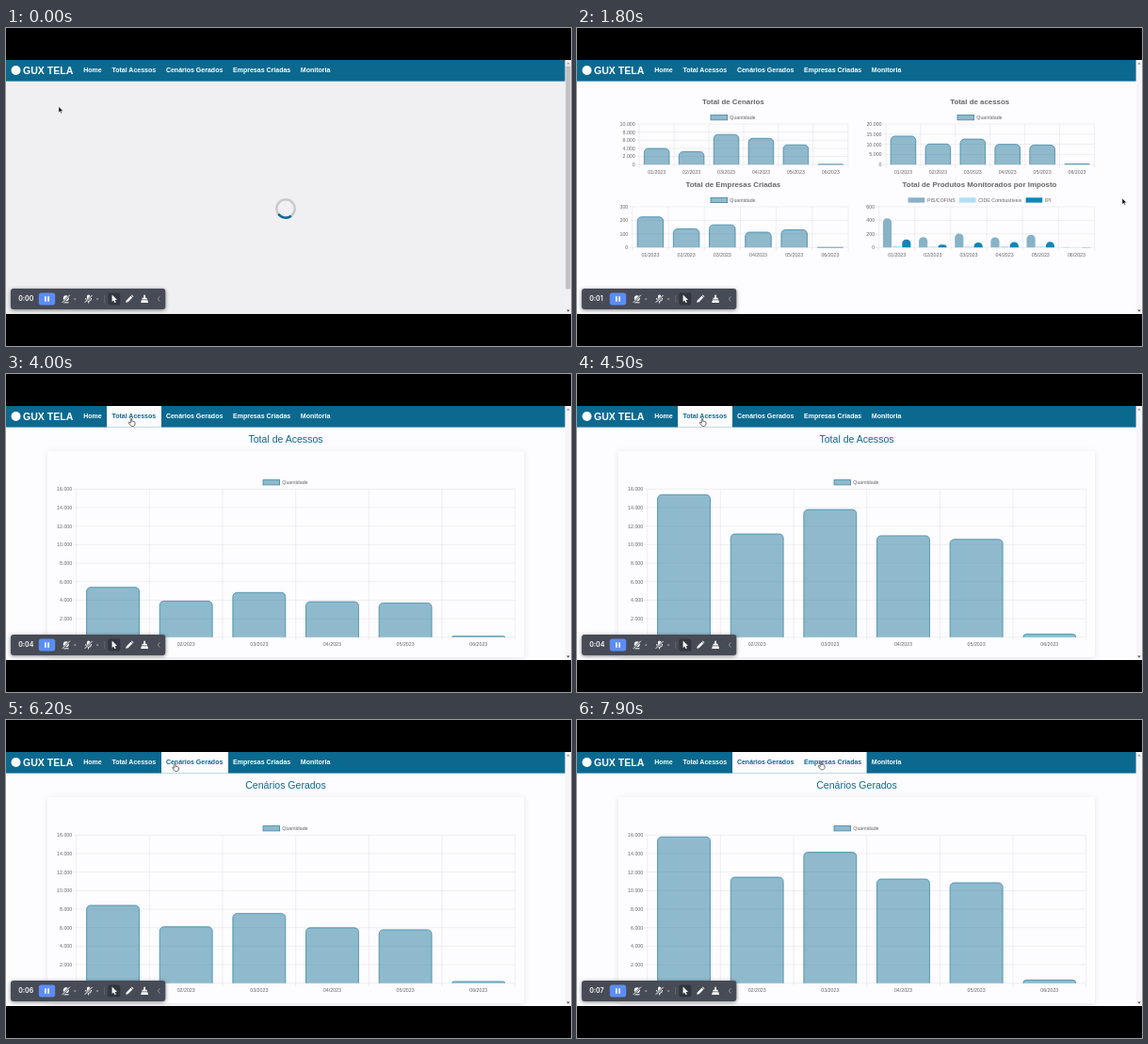
These frames come from a looping animation (600 by 338 pixels, 8 s). An HTML page:

```html
<!DOCTYPE html>
<html lang="pt-BR">
<head>
<meta charset="utf-8">
<title>Dashboard</title>
<style>
  html, body { margin: 0; width: 100%; height: 100%; overflow: hidden; background: #000; }
  svg { display: block; width: 600px; height: 338px; }
  text { font-family: "Liberation Sans", Arial, sans-serif; }
  .nav { font-size: 7.03px; font-weight: bold; }
  .brand { font-size: 10.55px; font-weight: bold; fill: #fff; }
  .axis { font-size: 5.27px; fill: #666; }
  .title { font-size: 7.9px; font-weight: bold; fill: #666; text-anchor: middle; }
  .page-title { font-size: 10.54px; fill: #0b6990; text-anchor: middle; }
  .timer { font: 600 7px Inter, sans-serif; fill: #fff; }
  .grid { stroke: #000; stroke-opacity: .1; stroke-width: .6; fill: none; }
  .icon { fill: #fff; }
  .line { fill: none; stroke: #fff; stroke-width: 1; stroke-linecap: round; }
  .card { filter: drop-shadow(0 1px 3px rgba(0, 0, 0, .1)); }
  .bar-shadow { filter: drop-shadow(0 1px 2px rgba(0, 0, 0, .45)); }
</style>
</head>
<body>
<svg viewBox="0 0 600 338">
  <rect width="600" height="338"/>
  <rect id="bg" y="34" width="600" height="270"/>

  <rect y="34" width="594" height="22.6" fill="#0b6990"/>
  <circle cx="10.5" cy="45" r="5" fill="#fff"/>
  <text class="brand" x="18" y="49">GUX TELA</text>
  <g id="nav"></g>

  <g id="load">
    <circle cx="297" cy="192" r="9.7" fill="none" stroke="#c9c8cb" stroke-width="2.4"/>
    <path id="arc" d="M290.14 198.86A9.7 9.7 0 0 0 303.86 198.86" fill="none" stroke="#0b6990" stroke-width="2.4"/>
  </g>
  <g id="dash"></g>
  <g id="detail">
    <text id="heading" class="page-title" x="297" y="72.7"></text>
    <rect class="card" x="44" y="82" width="506" height="219" rx="2" fill="#fdfcfe"/>
  </g>

  <rect y="304" width="600" height="34"/>
  <rect id="track" x="593.6" y="34" width="6.4" height="270"/>
  <rect id="thumb" x="594.4" y="40.5" width="5" height="237" fill="#c1c0c3"/>
  <path d="M595.2 38.6h3.6l-1.8-2.2z" fill="#98979a"/>
  <path d="M595.2 299.6h3.6l-1.8 2.2z" fill="#555"/>

  <g>
    <rect class="bar-shadow" x="5" y="277" width="164.3" height="22" rx="3" fill="#474b56"/>
    <text id="timer" class="timer" x="13.2" y="290.4"></text>
    <rect x="34.8" y="281.6" width="17.4" height="12.8" rx="2.6" fill="#5c8df6"/>
    <path class="icon" d="M41 285.3h1.7v5.4H41zM44.2 285.3h1.7v5.4h-1.7z"/>
    <circle class="icon" cx="63.8" cy="287.2" r="3"/>
    <path class="line" d="M61.5 291.8h4.6"/>
    <path d="M59.8 292l8-8" stroke="#474b56" stroke-width="2"/>
    <path class="line" d="M60 291.6l7.6-7.6"/>
    <rect class="icon" x="86" y="283.6" width="3.2" height="5.4" rx="1.6"/>
    <path class="line" d="M84.6 287.4a3 3 0 0 0 6 0M87.6 290.4v1.6"/>
    <path d="M83.7 292l8-8" stroke="#474b56" stroke-width="2"/>
    <path class="line" d="M83.9 291.6l7.4-7.4"/>
    <path d="M71.7 287.6h3l-1.5 1.7zM95.5 287.6h3l-1.5 1.7z" fill="#a9acb4"/>
    <path d="M104.6 284v8" stroke="#6d717b" stroke-width=".7"/>
    <rect x="108.3" y="281.4" width="13" height="13.2" rx="2" fill="#32363e"/>
    <path class="icon" d="M112.6 283.6v7.4l1.7-1.5 1.3 2.7 1.2-.6-1.2-2.6h2.4z"/>
    <path class="icon" d="M127.2 291.8l.6-2.4 4.7-4.7 1.8 1.8-4.7 4.7zM133 284.2l.7-.6 1.8 1.8-.7.7z"/>
    <path class="icon" d="M146.2 283.8h1.8v3h1.4l.7 1.8h-6l.7-1.8h1.4zM143.8 289.2h6.6l.6 2.8h-7.8z"/>
    <path d="M163.4 285.2l-2.1 2.7 2.1 2.7" fill="none" stroke="#989ba4" stroke-width=".9"/>
  </g>

  <path id="arrow" d="M0 0v6.4l1.5-1.3 1 2.2 1-.4-1-2.2h2z" fill="#000" stroke="#fff" stroke-width=".5"/>
  <path id="hand" d="M-.7 .3C-.7-.4.7-.4.7.3V3c.5-.5 1.1-.3 1.2.1.5-.3 1-.1 1.1.3.5-.2 1 0 1 .6v1.6C4 7.2 3 8 1.4 8 0 8-.6 7.6-1.2 6.6L-2.7 4.4c-.3-.7.5-1.1 1-.6l1 .9z" fill="#fff" stroke="#222" stroke-width=".65"/>
</svg>
<script>
const LOOP = 8000, DASH = 1400, ACCESS = 3800, SCENARIO = 5900;
const TEAL = 'rgba(11,105,144,.45)', EDGE = '#3d88a6';
const $ = id => document.getElementById(id);

function add(parent, tag, attrs, text) {
  const el = document.createElementNS('http://www.w3.org/2000/svg', tag);
  for (const k in attrs) el.setAttribute(k, attrs[k]);
  if (text !== undefined) el.textContent = text;
  return parent.appendChild(el);
}
const show = (el, on) => { el.style.display = on ? '' : 'none'; };
const thousands = n => String(n).replace(/\B(?=(\d{3})+$)/, '.');

// Menu: label, text x, tab left, tab right
const tabs = [
  ['Home', 82.2, 77, 107], ['Total Acessos', 112.4, 107, 165],
  ['Cenários Gerados', 169.9, 165, 236], ['Empresas Criadas', 241, 236, 307.6],
  ['Monitoria', 312.8, 307.6, 350]
].map(([label, x, left, right]) => ({
  left, right,
  box: add($('nav'), 'rect', { x: left, y: 34, width: right - left, height: 22.6, fill: '#fdfcfe' }),
  text: add($('nav'), 'text', { class: 'nav', x, y: 47.4 }, label)
}));

function legend(parent, x, y, label, fill, stroke) {
  add(parent, 'rect', { x, y: y - 2.7, width: 17.6, height: 5.3, fill, stroke, 'stroke-width': .8 });
  add(parent, 'text', { class: 'axis', x: x + 20.3, y: y + 1.9 }, label);
}

function chart(parent, c) {
  const { left, right, top, base, max, step } = c;
  const pitch = (right - left) / 6, scale = (base - top) / max;
  let grid = '';
  for (let v = 0; v <= max; v += step) {
    const y = base - v * scale;
    grid += `M${left - 3.5} ${y}H${right}`;
    add(parent, 'text', { class: 'axis', x: left - 4.5, y: y + 1.9, 'text-anchor': 'end' }, thousands(v));
  }
  for (let i = 0; i <= 6; i++) {
    grid += `M${left + i * pitch} ${top}V${base + 3.5}`;
    if (i < 6) add(parent, 'text', {
      class: 'axis', x: left + (i + .5) * pitch, y: base + 9.5, 'text-anchor': 'middle'
    }, `0${i + 1}/2023`);
  }
  add(parent, 'path', { class: 'grid', d: grid });
  const slot = pitch * .8 / c.sets.length, width = slot * .9;
  const bars = c.sets.flatMap(({ fill, stroke, data }, s) => data.map((v, i) => ({
    h: v * scale,
    x: left + (i + .5) * pitch + (s - c.sets.length / 2 + .5) * slot - width / 2,
    el: add(parent, 'path', { fill, stroke, 'stroke-width': .8 })
  })));
  return (t, start = c.start) => {
    const p = Math.min(1, Math.max(0, (t - start) / 1000)), ease = 1 - (1 - p) ** 4;
    for (const b of bars) {
      const h = b.h * ease, r = Math.min(4.4, h, width / 2);
      b.el.setAttribute('d', `M${b.x} ${base}v${r - h}a${r} ${r} 0 0 1 ${r} ${-r}h${width - 2 * r}a${r} ${r} 0 0 1 ${r} ${r}V${base}`);
    }
  };
}

const one = data => [{ data, fill: TEAL, stroke: EDGE }];
const access = [15800, 11450, 14150, 11250, 10850, 350];
const dash = $('dash'), detail = $('detail');

[['Total de Cenarios', 165.8, 81.2], ['Total de acessos', 427.7, 81.2],
 ['Total de Empresas Criadas', 165.8, 169.2], ['Total de Produtos Monitorados por Imposto', 427.5, 169.2]
].forEach(([label, x, y]) => add(dash, 'text', { class: 'title', x, y }, label));

legend(dash, 142, 95.2, 'Quantidade', TEAL, EDGE);
legend(dash, 404, 95.2, 'Quantidade', TEAL, EDGE);
legend(dash, 142, 183, 'Quantidade', TEAL, EDGE);
legend(dash, 351.6, 183, 'PIS/COFINS', '#87b2c7', 'none');
legend(dash, 406, 183, 'CIDE Combustíveis', '#b1def3', 'none');
legend(dash, 476.6, 183, 'IPI', '#0e85b7', 'none');
legend(detail, 273, 115.3, 'Quantidade', TEAL, EDGE);

const small = [
  chart(dash, { left: 66.2, right: 287.8, top: 102, base: 145.2, max: 10000, step: 2000, start: 1366,
    sets: one([4420, 3550, 8250, 7200, 5420, 90]) }),
  chart(dash, { left: 328, right: 549.5, top: 102, base: 145.2, max: 20000, step: 5000, start: 1381,
    sets: one(access) }),
  chart(dash, { left: 58.8, right: 288, top: 190, base: 233.2, max: 300, step: 100, start: 1413,
    sets: one([262, 159, 194, 131, 151, 0]) }),
  chart(dash, { left: 320.6, right: 549.5, top: 190, base: 233.2, max: 600, step: 200, start: 1451, sets: [
    { fill: '#87b2c7', stroke: 'none', data: [525, 187, 250, 180, 228, 4] },
    { fill: '#b1def3', stroke: 'none', data: [24, 10, 18, 22, 18, 3] },
    { fill: '#0e85b7', stroke: 'none', data: [145, 52, 90, 97, 99, 3] }
  ] })
];
const big = chart(detail, { left: 74.7, right: 540.6, top: 122.3, base: 279.8, max: 16000, step: 2000, sets: one(access) });

// Pointer path: time, x, y
const path = [
  [0, 56, 83.5], [300, 56, 83.5], [900, 456, 140], [1500, 579, 181], [2500, 579, 181],
  [2800, 530, 150], [3000, 113, 50], [3500, 113, 50], [3800, 133, 47.5], [5100, 133, 47.5],
  [5500, 179.5, 46.5], [6900, 179.5, 46.5], [7600, 252, 45], [7900, 259, 44.8], [LOOP, 259, 44.8]
];
function pointer(t) {
  const i = path.findIndex(k => k[0] > t), [t0, x0, y0] = path[i - 1], [t1, x1, y1] = path[i];
  const p = (t - t0) / (t1 - t0), e = p * p * (3 - 2 * p);
  return [x0 + (x1 - x0) * e, y0 + (y1 - y0) * e];
}

const ticks = [1100, 2000, 2900, 3900, 5200, 6100, 7100];

function render(t) {
  const loading = t < DASH, scenario = t >= SCENARIO;
  show($('load'), loading);
  show($('thumb'), loading);
  show(dash, !loading && t < ACCESS);
  show(detail, t >= ACCESS);
  $('bg').setAttribute('fill', loading ? '#f0eff1' : '#fdfcfe');
  $('track').setAttribute('fill', loading ? '#f1f0f2' : '#f6f5f7');
  $('arc').setAttribute('transform', `rotate(${8 + t * .36} 297 192)`);
  $('heading').textContent = scenario ? 'Cenários Gerados' : 'Total de Acessos';
  $('timer').textContent = '0:0' + ticks.filter(k => t >= k).length;
  small.forEach(draw => draw(t));
  big(t, scenario ? 6027 : 3901);

  const [x, y] = pointer(t), active = scenario ? 2 : t >= ACCESS ? 1 : -1;
  let over = false;
  tabs.forEach((tab, i) => {
    const hover = y < 56.6 && x >= tab.left && x < tab.right, lit = hover || i === active;
    over = over || hover;
    show(tab.box, lit);
    tab.text.setAttribute('fill', lit ? '#0b6990' : '#fff');
  });
  show($('arrow'), !over);
  show($('hand'), over);
  $(over ? 'hand' : 'arrow').setAttribute('transform', `translate(${x} ${y})`);
}

const begin = performance.now();
function loop() {
  const t = performance.now() - begin;
  render(Math.floor((t + 15) / 100) * 100 % LOOP);
  requestAnimationFrame(loop);
}
loop();
</script>
</body>
</html>
```
